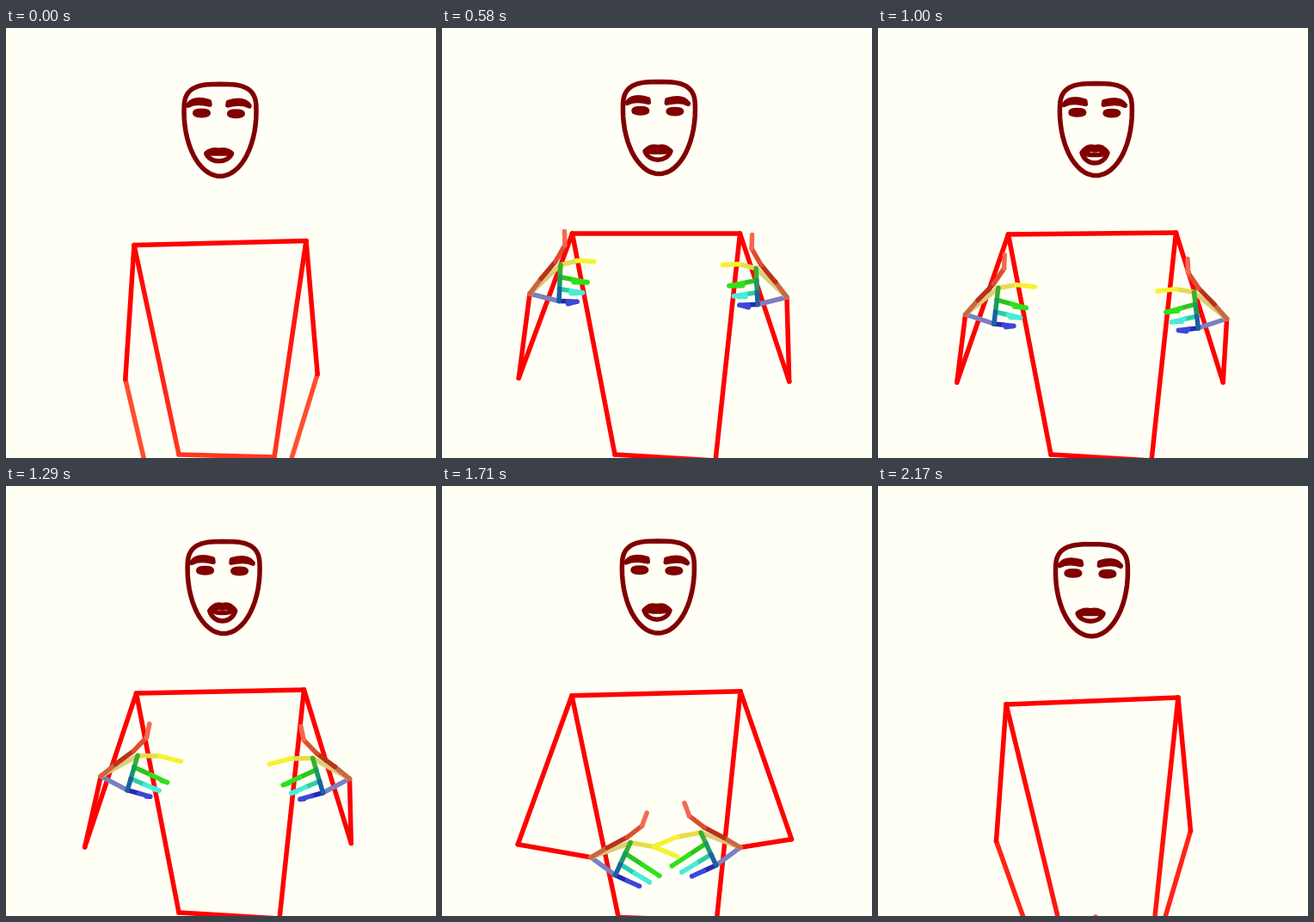
These frames come from a looping animation (500 by 500 pixels, 2.21 s). An HTML page with a canvas:

```html
<!DOCTYPE html>
<html lang="en">
<head>
<meta charset="utf-8">
<title>Pose skeleton</title>
<style>
html, body { margin: 0; width: 100%; height: 100%; overflow: hidden; background: #fffff5; }
canvas { display: block; width: 500px; height: 500px; }
</style>
</head>
<body>
<canvas id="stage" width="500" height="500"></canvas>
<script>
const ctx = document.getElementById('stage').getContext('2d');
const LOOP = 2210, COUNT = 53, HANDS_FROM = 9;
const PAPER = '#fffff5', FACE = '#800000';

// Monotone cubic through [step, value] pairs
function track(...keys) {
  const last = keys.length - 1;
  const rise = k => (keys[k + 1][1] - keys[k][1]) / (keys[k + 1][0] - keys[k][0]);
  const slope = k => {
    if (k === 0 || k === last) return 0;
    const p = rise(k - 1), q = rise(k);
    return p * q <= 0 ? 0 : 2 * p * q / (p + q);
  };
  return n => {
    if (n <= keys[0][0]) return keys[0][1];
    if (n >= keys[last][0]) return keys[last][1];
    const i = keys.findIndex(k => k[0] > n) - 1;
    const [n0, a] = keys[i], [n1, b] = keys[i + 1];
    const h = n1 - n0, u = (n - n0) / h, v = 1 - u;
    return a * (1 + 2 * u) * v * v + slope(i) * h * u * v * v
      + b * u * u * (3 - 2 * u) - slope(i + 1) * h * u * u * v;
  };
}

// Arms mirror each other: half span and height of each joint
const raise = track([0, 0], [7, 0.3], [14, 1], [37, 1], [46, 0.35], [52, 0]);
const tilt = track([0, -5], [7, -4.5], [14, 0], [37, -5], [46, -5], [52, -8]);
const elbowSpan = track([0, 111.5], [7, 122], [14, 157], [24, 154.5], [37, 155], [46, 145], [52, 113]);
const elbowY = track([0, 405.5], [7, 397.5], [14, 409], [24, 412], [37, 421], [46, 403.5], [52, 407]);
const wristSpan = track([0, 72.5], [7, 89.5], [14, 149.5], [24, 152], [37, 129.5], [46, 36], [52, 66]);
const wristY = track([0, 550], [7, 440], [14, 311], [24, 335.5], [37, 342.5], [46, 545], [52, 552]);
const wristMid = track([0, 244.5], [14, 251.5], [37, 256.5], [46, 264], [52, 253]);
const wristTilt = track([7, -1], [14, 4], [24, 5], [37, -1], [46, -24], [52, 0]);
const hipDrop = track([37, 0], [46, 1]);
const handTurn = track([14, 0], [24, 0.2], [37, 1], [46, 1.1]);
const nod = track([0, 0], [7, -2.2], [14, -2.7], [24, -0.7], [37, -0.8], [46, -1.7], [52, 2.4]);
const talk = track([0, 0], [7, 1], [14, 0.3], [24, 0.8], [37, 0.75], [46, 0], [52, 0]);

const mix = (a, b, u) => [a[0] + (b[0] - a[0]) * u, a[1] + (b[1] - a[1]) * u];
const red = g => `rgb(255,${Math.round(g)},${Math.round(g * 0.6)})`;
const pair = (mid, span, y, lean) => [[mid - span, y - lean / 2], [mid + span, y + lean / 2]];
const step = ([x, y], deg, len) => {
  const a = deg * Math.PI / 180;
  return [x + len * Math.cos(a), y + len * Math.sin(a)];
};

function bone(a, b, from, to = from) {
  const g = ctx.createLinearGradient(...a, ...b);
  g.addColorStop(0, from);
  g.addColorStop(1, to);
  ctx.strokeStyle = from === to ? from : g;
  ctx.beginPath();
  ctx.moveTo(...a);
  ctx.lineTo(...b);
  ctx.stroke();
}

function chain(pts, colors) {
  colors.forEach((c, i) => bone(pts[i], pts[i + 1], c));
}

function drawBody(n) {
  const up = raise(n), lean = tilt(n), drop = hipDrop(n);
  const settle = Math.min(1, n / 7);
  const fade = Math.max(0, 1 - n / 14, (n - 44) / 18);
  const flare = 0.2 * Math.abs(wristY(n + 0.5) - wristY(n - 0.5));
  const shoulders = pair(249, 100 - 2.5 * up, 250 - 11 * up, lean);
  const elbows = pair(250.5 - 4 * up, elbowSpan(n) + flare, elbowY(n), 2 * lean + 4);
  const wrists = pair(wristMid(n), wristSpan(n), wristY(n), wristTilt(n));
  const hips = [
    [201 + 10 * drop, 496 + 13 * drop],
    [312 + 6 * settle + 3 * drop, 499 + 4 * settle + 7 * drop]];

  bone(...hips, red(55 * fade));
  shoulders.forEach((s, i) => {
    bone(s, hips[i], red(0), red(55 * fade));
    bone(elbows[i], wrists[i], red(78 * fade));
    bone(s, elbows[i], red(0));
  });
  bone(...shoulders, red(0));
  return wrists;
}

// One hand at the origin, pointing right
function drawHand(n) {
  const open = Math.min(1, handTurn(n)), turn = 21 * handTurn(n);
  const wrist = [0, 0];
  const index = step(wrist, turn - 43, 49), little = step(wrist, turn + 14, 35);
  const knuckles = [0, 1, 2, 3].map(k => mix(index, little, k / 3));
  const tips = knuckles.map((p, k) =>
    step(p, turn - 6 + [0, 17, 15, 8][k], (39 + 18 * open) * [1, 0.83, 0.7, 0.54][k]));

  const thumb = [wrist];
  [-53, -50, -60, -92].forEach((deg, i) => thumb.push(step(thumb[i], deg + turn, [22, 26, 22, 16][i])));

  bone(wrist, little, '#7a80c0');
  bone(wrist, index, '#dfc07c', '#dcd078');
  chain(thumb, ['#c9683f', '#bc3018', '#e04c30', '#f36a50']);

  const [x, y] = mix(index, tips[0], 0.5);
  chain([index, [x, y - 3], tips[0]], ['#e6dc4c', '#f5f232']);
  [['#2cc41c', '#30e01c'], ['#2ccca4', '#48ecd8'], ['#2428b4', '#3c48d8']].forEach(([base, end], i) => {
    const p = knuckles[i + 1], tip = tips[i + 1];
    const [bx, by] = mix(tip, p, 0.5 * (1 - open));
    chain([p, mix(p, tip, 0.5), tip, [bx, by + 3 * (1 - open)]], [base, end, end]);
  });
  chain(knuckles, ['#38b028', '#169a64', '#1c60a4']);
}

function placeHand([x, y], side, n) {
  ctx.save();
  ctx.translate(x, y);
  ctx.scale(side, 1);
  drawHand(n);
  ctx.restore();
}

// Squared crown, elliptical jaw
function drawOval(x, y) {
  ctx.beginPath();
  for (let d = 0; d < 360; d += 6) {
    const c = Math.cos(d * Math.PI / 180), s = Math.sin(d * Math.PI / 180);
    const p = s < 0 ? 0.65 : 1;
    const ease = v => Math.sign(v) * Math.abs(v) ** p;
    ctx.lineTo(x + 42 * ease(c), y + (s < 0 ? 32 : 75) * ease(s));
  }
  ctx.closePath();
  ctx.stroke();
}

function drawLips(x, corner, w, top, bottom) {
  ctx.beginPath();
  ctx.moveTo(x - w, corner);
  ctx.bezierCurveTo(x - w * 0.6, top - 1, x - w * 0.3, top - 0.5, x, top + 0.5);
  ctx.bezierCurveTo(x + w * 0.3, top - 0.5, x + w * 0.6, top - 1, x + w, corner);
  const low = corner + (bottom - corner) * 1.33;
  ctx.bezierCurveTo(x + w * 0.7, low, x - w * 0.7, low, x - w, corner);
  ctx.closePath();
  ctx.stroke();
}

function drawFace(n) {
  const open = talk(n);
  ctx.save();
  ctx.translate(4.4 * Math.sin(Math.PI * n / 50), nod(n));
  ctx.strokeStyle = FACE;
  drawOval(249, 97.3);

  for (const side of [-1, 1]) {
    const x = d => 247.4 + side * d, y = side * 0.4;
    ctx.beginPath();
    ctx.ellipse(x(20), 99.4 + y, 7.8, 2.7, 0, 0, Math.PI * 2);
    ctx.stroke();
    ctx.beginPath();
    ctx.moveTo(x(35.5), 90 + y);
    ctx.quadraticCurveTo(x(29), 80.5 + y, x(11), 86 + y);
    ctx.lineTo(x(10.5), 89.5 + y);
    ctx.quadraticCurveTo(x(26), 85.5 + y, x(35.5), 90.5 + y);
    ctx.stroke();
  }

  const mid = 148.3, half = 6.5 + 3.8 * open, inner = mid - half + 3.3;
  drawLips(247.6, mid - 2.5, 15, mid - half, mid + half);
  drawLips(247.6, mid - 2.5, 12, inner, inner + 1 + 6.5 * open);
  ctx.restore();
}

function draw(n) {
  ctx.fillStyle = PAPER;
  ctx.fillRect(0, 0, 500, 500);
  ctx.lineWidth = 5.5;
  ctx.lineCap = ctx.lineJoin = 'round';
  drawFace(n);
  const [left, right] = drawBody(n);
  if (n >= HANDS_FROM) {
    placeHand(left, 1, n);
    placeHand(right, -1, n);
  }
}

// 24 steps a second, each start rounded to 10 ms
const begin = n => Math.round(n * 100 / 24) * 10;
const start = performance.now();

function tick() {
  const t = (performance.now() - start) % LOOP;
  let n = 0;
  while (n < COUNT - 1 && begin(n + 1) <= t) n++;
  draw(n);
  requestAnimationFrame(tick);
}
tick();
</script>
</body>
</html>
```
